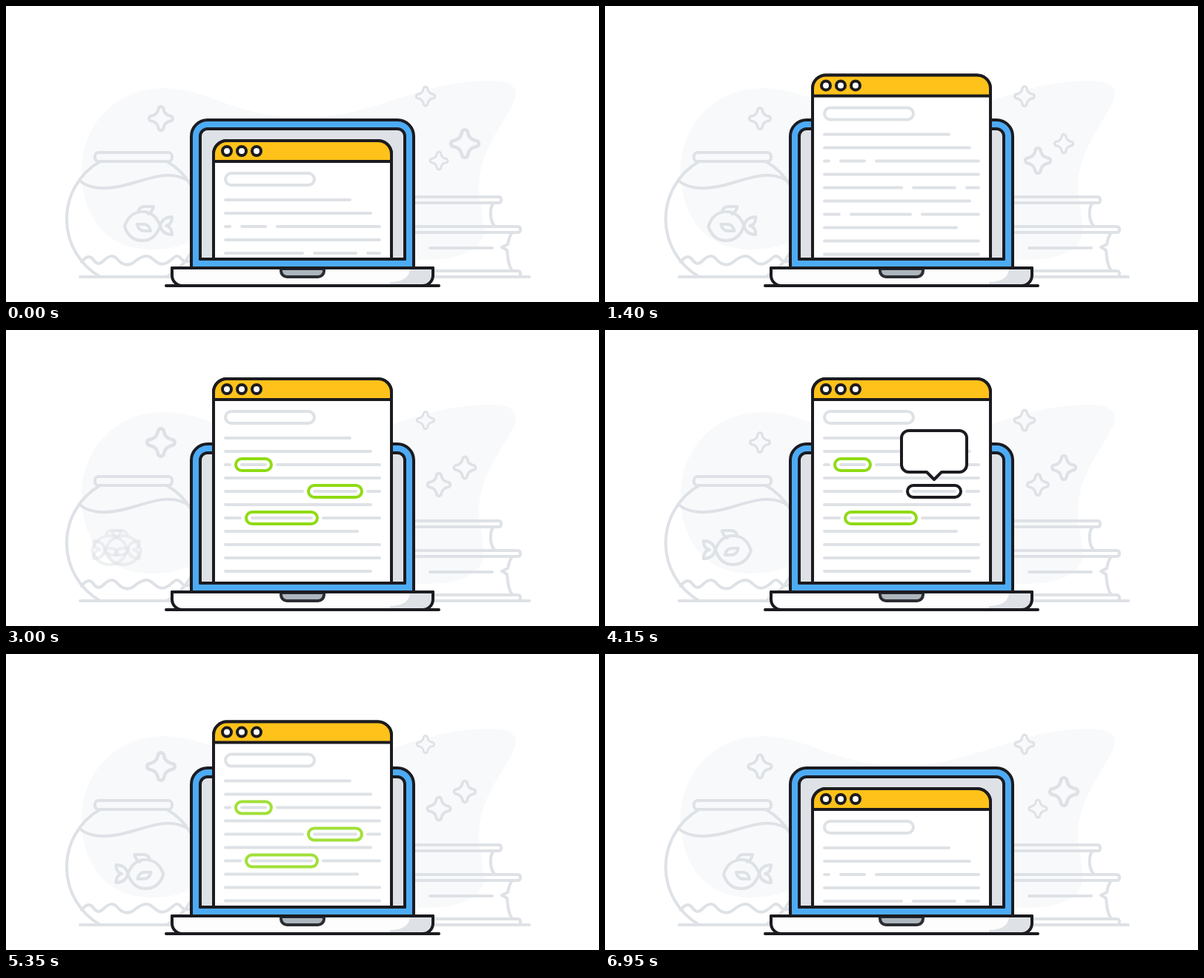
An HTML page that plays this animation: 800 px wide and 400 px high, repeating every 7 s.

```html
<!DOCTYPE html>
<html lang="en">
<head>
<meta charset="utf-8">
<title>Laptop and fishbowl</title>
<style>
  html, body { margin: 0; width: 100%; height: 100%; overflow: hidden; background: #fff; }
  svg { display: block; width: 800px; height: 400px; }
  .grey { stroke: #dee2e6; }
  .dark { stroke: #1b1b20; }
</style>
</head>
<body>
<svg viewBox="0 0 800 400" fill="none" stroke-width="4" stroke-linecap="round" stroke-linejoin="round">
  <defs>
    <clipPath id="slot"><rect width="800" height="342"/></clipPath>
    <g id="fishShape">
      <path d="M160 298C164 285 173 278 184 278C196 278 204 286 208 297C204 309 196 317 184 317C172 317 164 310 160 298Z"/>
      <path d="M178 279C179 274 182 271 187 271H199C198 276 196 279 192 281"/>
      <path d="M208 297C210 289 215 285 224 285C224 292 221 296 216 297C221 298 224 302 224 309C215 309 210 305 208 297Z"/>
      <path d="M177 295H186C191 295 194 299 195 304H187C181 304 178 300 177 295Z"/>
    </g>
  </defs>

  <path fill="#f8f9fb" d="M102 225C102 158 150 111 212 111C275 111 310 151 400 151C500 151 550 101 655 101C684 101 693 112 685 130C672 158 640 195 638 240C637 265 645 280 644 305C643 330 610 343 570 343H300L250 318C235 326 215 329 195 329C135 329 102 283 102 225Z"/>

  <g class="grey">
    <path d="M100 366H706"/>
    <rect x="120" y="198" width="104" height="12" rx="5"/>
    <path d="M127 210A90 90 0 0 0 127 366M217 210A90 90 0 0 1 217 366"/>
    <path d="M99 236C115 249 140 249 172 239S228 222 250 239"/>
    <path d="M102 346C107 339 113 336 118 343S127 349 133 343S145 336 151 343S166 352 173 346S189 334 197 341S209 351 217 347S229 333 236 341S246 345 252 342"/>
    <g id="stars"></g>
    <use id="fishL" href="#fishShape"/>
    <use id="fishR" href="#fishShape"/>
    <path d="M540 258H665Q668 258 668 262T665 266H540M658 266C652 272 652 291 660 298"/>
    <path d="M540 298H690Q694 298 694 302T690 306H540M683 306C679 311 678 316 677 322L669 326L676 330C677 342 678 351 683 358"/>
    <path d="M540 358H690Q694 358 694 362T690 366M572 327H656"/>
  </g>

  <g class="dark">
    <path fill="#4dabf5" d="M250 354V176A22 22 0 0 1 272 154H528A22 22 0 0 1 550 176V354Z"/>
    <path fill="#dee2e6" d="M262 342V176A10 10 0 0 1 272 166H528A10 10 0 0 1 538 176V342Z"/>
  </g>

  <g clip-path="url(#slot)">
    <g id="page">
      <path class="dark" fill="#fff" d="M280 400V84A18 18 0 0 1 298 66H502A18 18 0 0 1 520 84V400Z"/>
      <path class="dark" fill="#ffc21a" d="M280 94V84A18 18 0 0 1 298 66H502A18 18 0 0 1 520 84V94Z"/>
      <g class="dark" fill="#fff">
        <circle cx="298" cy="80" r="6"/><circle cx="318" cy="80" r="6"/><circle cx="338" cy="80" r="6"/>
      </g>
      <rect class="grey" x="296" y="110" width="120" height="16" rx="8"/>
      <path id="text" class="grey"/>
      <g id="marks"></g>
      <path id="bubble" class="dark" fill="#fff" d="M410 136H478A10 10 0 0 1 488 146V182A10 10 0 0 1 478 192H454L444 202L434 192H410A10 10 0 0 1 400 182V146A10 10 0 0 1 410 136Z"/>
    </g>
  </g>

  <path class="dark" d="M262 342H538"/>
  <path fill="#fdfdfd" d="M224 354H576V364A14 14 0 0 1 562 378H238A14 14 0 0 1 224 364Z"/>
  <path fill="#dee2e6" d="M545 354H576V364A14 14 0 0 1 562 378H518V373C534 373 545 367 545 354Z"/>
  <path class="dark" d="M224 354H576V364A14 14 0 0 1 562 378H238A14 14 0 0 1 224 364Z"/>
  <path fill="#adb5bd" stroke="#2b2d33" d="M371 355H429V358A8 8 0 0 1 421 366H379A8 8 0 0 1 371 358Z"/>
  <path class="dark" d="M224 354H576M216 378H584"/>
</svg>

<script>
const LOOP = 7000;
const $ = id => document.getElementById(id);
const clamp = v => Math.min(1, Math.max(0, v));
const ramp = (t, from, to) => clamp((t - from) / (to - from));
const smooth = p => (1 - Math.cos(Math.PI * p)) / 2;

function add(parent, tag, attrs) {
  const el = document.createElementNS("http://www.w3.org/2000/svg", tag);
  set(el, attrs);
  parent.append(el);
  return el;
}
function set(el, attrs) {
  for (const k in attrs) el.setAttribute(k, attrs[k]);
}

// Eased progress on cubic-bezier(.8, 0, .4, 1)
function slide(x) {
  let lo = 0, hi = 1;
  for (let i = 0; i < 24; i++) {
    const s = (lo + hi) / 2, r = 1 - s;
    if (2.4 * s * r * r + 1.2 * s * s * r + s * s * s < x) lo = s; else hi = s;
  }
  return lo * lo * (3 - 2 * lo);
}

// Text lines: segment ends per row, rows 18 px apart
const rows = [
  [296, 464], [296, 492], [296, 302, 318, 350, 366, 504], [296, 504],
  [296, 400, 416, 472, 488, 504], [296, 492], [296, 316, 332, 412, 428, 504],
  [296, 474], [296, 504], [296, 504], [296, 492]
];
$("text").setAttribute("d", rows.map((row, i) =>
  row.map((x, j) => j % 2 ? "H" + x : `M${x} ${146 + 18 * i}`).join("")).join(""));

// Stars: centre, mean radius, swing, phase in turns
const starArm = "C4.5 -7 7 -4.5 14.5 -3Q17.5 0 14.5 3C7 4.5 4.5 7 3 14.5Q0 17.5 -3 14.5C-4.5 7 -7 4.5 -14.5 3Q-17.5 0 -14.5 -3C-7 -4.5 -4.5 -7 -3 -14.5Q0 -17.5 3 -14.5Z";
const stars = [
  { x: 209, y: 152, r: 18, swing: 3.1, phase: 0 },
  { x: 566, y: 122, r: 14.3, swing: 1.2, phase: .5 },
  { x: 619, y: 186, r: 17.3, swing: 3.9, phase: .25 },
  { x: 584, y: 209, r: 16.6, swing: 3.1, phase: .75 }
];
for (const s of stars) s.el = add($("stars"), "path", { d: "M3 -14.5" + starArm });

const marks = [
  { x: 310, y: 174, w: 48, start: 1550 },
  { x: 408, y: 210, w: 72, start: 1850 },
  { x: 324, y: 246, w: 96, start: 2150 }
];
for (const m of marks) m.el = add($("marks"), "rect", { x: m.x, y: m.y, height: 16, stroke: "#8fdb14" });

function mix(p) {
  const from = [143, 219, 20], to = [27, 27, 32];
  return `rgb(${from.map((c, i) => Math.round(c + (to[i] - c) * p))})`;
}

function draw(t) {
  for (const s of stars) {
    const r = s.r + s.swing * Math.sin(2 * Math.PI * (3 * t / LOOP + s.phase));
    s.el.setAttribute("transform", `translate(${s.x} ${s.y}) scale(${r / 18})`);
  }

  const swim = 44 * (ramp(t, 3000, 6400) - ramp(t, 0, 3000));
  const turned = ramp(t, 2900, 3100) - ramp(t, 6750, 6950);
  set($("fishL"), { transform: `translate(${swim} 0)`, opacity: 1 - turned });
  set($("fishR"), { transform: `translate(${386 + swim} 0) scale(-1 1)`, opacity: turned });

  // Closing runs the opening backwards
  const u = t < 3400 ? t : 6765 - t;
  set($("page"), { transform: `translate(0 ${116 * (1 - slide(ramp(u, 204, 2014)))})` });

  const fade = 1 - ramp(t, 5250, 5900);
  for (const m of marks) {
    const p = smooth(ramp(t, m.start, m.start + 500));
    set(m.el, { width: m.w * p, rx: 8 * p, ry: 8 * p, opacity: p ? fade : 0 });
  }

  const talk = smooth(ramp(t, 3100, 3500)) - smooth(ramp(t, 4550, 4950));
  marks[1].el.setAttribute("stroke", mix(talk));
  const size = .6 + .4 * talk;
  set($("bubble"), {
    opacity: talk,
    transform: `translate(444 202) scale(${size}) translate(-444 -202)`
  });
}

const begin = performance.now();
function tick() {
  draw((performance.now() - begin) % LOOP);
  requestAnimationFrame(tick);
}
tick();
</script>
</body>
</html>
```
